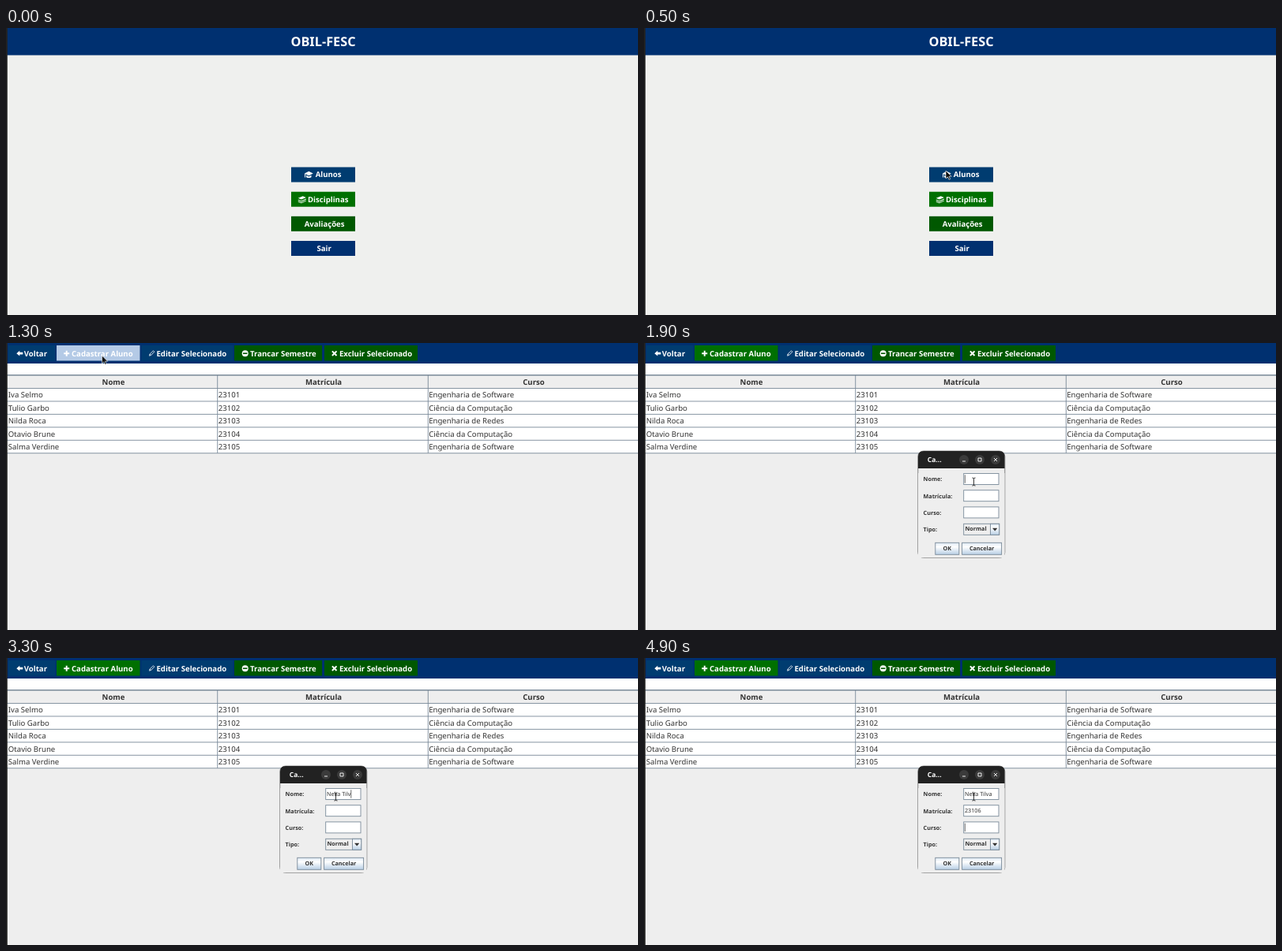
These frames come from a looping animation (800 px wide and 364 px high, 5 s). An HTML page:

```html
<!DOCTYPE html>
<html lang="pt">
<head>
<meta charset="utf-8">
<style>
  html, body { margin: 0; width: 100%; height: 100%; overflow: hidden; background: #eff0ee; }
  svg { display: block; width: 100vw; height: 100vh; }
  text { font: 9.6px "Noto Sans", sans-serif; fill: #333; white-space: pre; text-rendering: geometricPrecision; }
  .bold { font-weight: bold; }
  .white { fill: #fff; }
  .small { font-size: 7.2px; }
  .mid { text-anchor: middle; }
</style>
</head>
<body>
<svg id="stage" viewBox="0 0 800 364"></svg>
<script>
const NAVY = '#003070', BLUE = '#003c70', GREEN = '#007000', DARK_GREEN = '#005800', GRID = '#7a8a99';
const LOOP = 5000, STEP = 100;
const stage = document.getElementById('stage');

const rect = (x, y, w, h, fill, extra = '') =>
  `<rect x="${x}" y="${y}" width="${w}" height="${h}" fill="${fill}" ${extra}/>`;
const text = (x, y, str, cls = '', extra = '') => `<text x="${x}" y="${y}" class="${cls}" ${extra}>${str}</text>`;
const path = (d, fill, extra = '') => `<path d="${d}" fill="${fill}" ${extra}/>`;
const line = (d, stroke, width = 1) => path(d, 'none', `stroke="${stroke}" stroke-width="${width}"`);
const at = (x, y, content) => `<g transform="translate(${x} ${y})">${content}</g>`;

// Icons are centred on their own origin.
const icons = {
  cap: path('M-5.5-1.5L0-4.2 5.5-1.5 0 1.2zM-3.2 .8L0 2.4 3.2 .8V3.2Q0 5-3.2 3.2zM-5.2-1h1v4.6h-1z', '#fff'),
  books: path('M-5-1.5L1-4 5-2.2-1 .4zM-5 .2L-1 2 5-.6V.6L-1 3.1-5 1.4zM-5 2.4L-1 4.1 5 1.5V2.4L-1 5-5 3.3z', '#fff'),
  back: path('M-4 0L0-3.4V-1.4H4V1.4H0V3.4z', '#fff'),
  plus: path('M-1-3.5H1V-1H3.5V1H1V3.5H-1V1H-3.5V-1H-1z', '#fff'),
  pencil: line('M-3 3L-2.4 .8 2-3.4 3.4-2-1 2.3zM-2.4 .8L-1 2.3', '#fff', .8),
  stop: '<circle r="4" fill="#fff"/>' + rect(-2.7, -.8, 5.4, 1.6, DARK_GREEN),
  cross: line('M-2.8-2.8L2.8 2.8M2.8-2.8L-2.8 2.8', '#fff', 2),
};

const menuButton = (y, fill, label, x, icon, iconX) =>
  rect(361, y, 81, 19, fill) + (icon ? at(iconX, y + 9.5, icons[icon]) : '') +
  text(x, y + 12.8, label, 'bold white');

const toolButton = (x, w, fill, icon, iconX, label, textX, id = '') =>
  rect(x, 3, w, 19.5, fill, id && `id="${id}"`) + at(iconX, 13.2, icons[icon]) +
  text(textX, 16.5, label, 'bold white');

function home() {
  return rect(0, 0, 800, 364, '#eff0ee') + rect(0, 0, 800, 34.5, NAVY) +
    text(401.5, 23.3, 'OBIL-FESC', 'bold white mid', 'style="font-size:16.3px"') +
    menuButton(176.5, BLUE, 'Alunos', 391.7, 'cap', 383.3) +
    menuButton(207.7, GREEN, 'Disciplinas', 382, 'books', 374.8) +
    menuButton(238.8, DARK_GREEN, 'Avaliações', 377.7) +
    menuButton(270, NAVY, 'Sair', 393.5);
}

function table() {
  const people = ['Iva Selmo', 'Tulio Garbo', 'Nilda Roca', 'Otavio Brune', 'Salma Verdine'];
  const courses = ['Engenharia de Software', 'Ciência da Computação', 'Engenharia de Redes'];
  const courseOf = [0, 1, 2, 1, 0];
  const rowHeight = 16.45, top = 57.5;
  let out = rect(0, 0, 800, 364, '#eee') + rect(0, 0, 800, 26, NAVY) +
    toolButton(3, 59.5, BLUE, 'back', 17.3, 'Voltar', 22.8) +
    toolButton(64, 105.5, GREEN, 'plus', 76.7, 'Cadastrar Aluno', 83, 'add') +
    toolButton(171.5, 116, BLUE, 'pencil', 184.5, 'Editar Selecionado', 190.5) +
    toolButton(289, 111, DARK_GREEN, 'stop', 302.7, 'Trancar Semestre', 309) +
    toolButton(403, 118, DARK_GREEN, 'cross', 415.7, 'Excluir Selecionado', 422) +
    rect(0, 26, 800, 14, '#fff') + rect(0, top, 800, rowHeight * 5, '#fff') +
    line('M0 40.8H800', GRID, 1.4);
  [['Nome', 136], ['Matrícula', 402], ['Curso', 668]].forEach(([label, x]) => {
    out += text(x, 53.4, label, 'bold mid');
  });
  people.forEach((person, i) => {
    const y = 69.4 + i * rowHeight;
    out += text(2.8, y, person) + text(268.8, y, 23101 + i) + text(535.2, y, courses[courseOf[i]]);
  });
  for (let i = 0; i < 6; i++) out += line(`M0 ${top + i * rowHeight}H800`, GRID, .9);
  return out + line('M267.7 41V139.7M534.3 41V139.7', GRID, .9);
}

function dialog() {
  let out = rect(346.8, 137, 110, 135.5, '#eee', 'rx="7" stroke="#666" stroke-width=".8"') +
    rect(347, 165, 109.5, 107.3, '#eee') +
    path('M347 159V144q0-7 7-7h95.5q7 0 7 7v15z', '#222') +
    text(358.8, 151, 'Ca...', 'bold white', 'style="font-size:8.5px"');
  [405, 425, 445].forEach(x => out += `<circle cx="${x}" cy="148" r="6" fill="#3b3b3b"/>`);
  out += line('M403 150H407M423 146H427V150H423zM443 146L447 150M447 146L443 150', '#fff', .9);
  ['Nome:', 'Matrícula:', 'Curso:', 'Tipo:'].forEach((label, i) => {
    const y = 165.5 + i * 21.2;
    out += text(353.6, y + 9.9, label, 'bold small');
    if (i < 3) {
      out += rect(404.7, y, 44.3, 14, '#fff', `stroke="${GRID}" stroke-width=".9"`) +
        text(406, y + 9.4, '', 'small', 'data-field');
    }
  });
  const metal = `fill="url(#metal)" stroke="${GRID}" stroke-width=".9"`;
  const button = (x, y, w, h) => `<rect x="${x}" y="${y}" width="${w}" height="${h}" ${metal}/>`;
  return out + rect(404.7, 229.3, 45, 14, '#eee', `stroke="${GRID}" stroke-width=".9"`) +
    button(438.5, 229.3, 11.2, 14) + path('M441 234.8H447.4L444.2 238.4z', '#333') +
    text(406.5, 238.4, 'Normal', 'bold small') +
    button(368.8, 253.3, 30, 15) + text(383.8, 263.4, 'OK', 'bold small mid') +
    button(402.6, 253.3, 50, 15) + text(427.6, 263.4, 'Cancelar', 'bold small mid') +
    line('', '#444', .8).replace('<path', '<path id="caret"');
}

stage.innerHTML =
  '<defs><linearGradient id="metal" x2="0" y2="1"><stop stop-color="#dde8f3"/>' +
  '<stop offset=".35" stop-color="#fff"/><stop offset="1" stop-color="#b8cfe5"/></linearGradient></defs>' +
  `<g id="home">${home()}</g><g id="table">${table()}</g><g id="dialog">${dialog()}</g>` +
  rect(0, 0, 1.8, 364, '#222') +
  '<g id="arrow">' + path('M0 0V10L2.4 7.9 4 11.3 5.7 10.5 4.1 7.2H7.2z', '#111', 'stroke="#fff" stroke-width=".6"') + '</g>' +
  '<g id="beam">' + line('M-2-5Q0-5 0-4V4Q0 5-2 5M2-5Q0-5 0-4M0 4Q0 5 2 5', '#222', .9) + '</g>';

const $ = id => document.getElementById(id);
const fields = [...stage.querySelectorAll('[data-field]')];
const show = (id, on) => $(id).style.display = on ? '' : 'none';

// Pointer waypoints: time, x, y.
const route = [[100, 760, 192], [300, 540, 180], [500, 382, 181], [700, 382, 181],
  [1200, 121.5, 16], [1500, 121.5, 16], [1700, 400, 166], [1800, 400, 166], [1900, 417.5, 176]];

function pointer(t) {
  const next = route.findIndex(p => p[0] >= t);
  if (next < 0) return route.at(-1).slice(1);
  if (next === 0) return route[0].slice(1);
  const [t0, x0, y0] = route[next - 1], [t1, x1, y1] = route[next];
  const k = (t - t0) / (t1 - t0), ease = k * k * (3 - 2 * k);
  return [x0 + (x1 - x0) * ease, y0 + (y1 - y0) * ease];
}

// The name is first mistyped, erased back to the slip and completed.
function typedName(t) {
  const slip = 'Nelia Tlva´', name = 'Nelia Tilva';
  if (t <= 2700) return slip.slice(0, Math.max(0, Math.round((t - 1900) / 800 * slip.length)));
  if (t < 3000) return slip.slice(0, t < 2900 ? 10 : 8);
  return name.slice(0, 7 + (t - 3000) / STEP);
}

function render(t) {
  const open = t >= 1500, focus = t < 3600 ? 0 : t < 4700 ? 1 : 2;
  show('home', t < 600);
  show('table', t >= 600);
  show('dialog', open);
  $('add').setAttribute('fill', t >= 1300 && t < 1500 ? '#b4cae6' : GREEN);

  const [x, y] = pointer(t);
  show('arrow', t >= 100 && t < 1900);
  show('beam', t >= 1900);
  for (const id of ['arrow', 'beam']) $(id).setAttribute('transform', `translate(${x} ${y})`);

  const values = [typedName(t), '23106'.slice(0, Math.max(0, (t - 4000) / STEP)), ''];
  fields.forEach((field, i) => field.textContent = values[i]);
  if (!open) return;
  const end = 406.3 + (values[focus] ? fields[focus].getComputedTextLength() : 0);
  const top = 167.3 + focus * 21.2;
  const composing = values[focus].endsWith('´');
  $('caret').setAttribute('d', composing ? `M${end - 3} ${top + 9.6}H${end}` : `M${end} ${top}v10.4`);
}

function tick() {
  render(Math.floor(performance.now() % LOOP / STEP) * STEP);
  requestAnimationFrame(tick);
}
tick();
</script>
</body>
</html>
```
